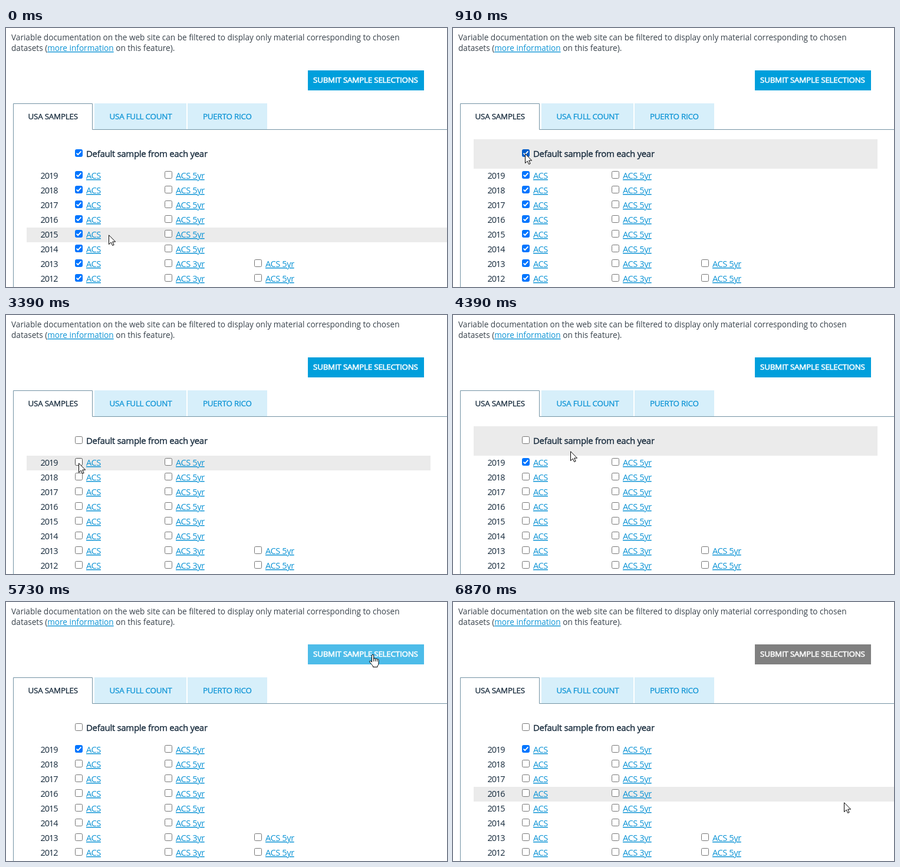
Recreate the animation shown at these times as an HTML page. Size 748x440 px, loop 6940 ms.

```html
<!DOCTYPE html>
<html lang="en">
<head>
<meta charset="utf-8">
<title>Sample selection</title>
<style>
  html, body { margin: 0; width: 100%; height: 100%; overflow: hidden; background: #fff; }
  svg { display: block; width: 748px; height: 440px; font-family: "Open Sans", "Noto Sans", sans-serif; }
  text { white-space: pre; fill: currentColor; color: #14283a; }
  .intro { font-size: 13.6px; color: #38424b; }
  .tab { font-size: 13.4px; letter-spacing: -.22px; stroke: currentColor; stroke-width: .3px; }
  .heading { font-size: 15px; letter-spacing: -.32px; stroke: currentColor; stroke-width: .35px; }
  .year { font-size: 14.4px; letter-spacing: -.95px; }
  .link { font-size: 14.6px; letter-spacing: -.42px; }
  .link, a { fill: #0b93d5; text-decoration: underline; }
  .blue { color: #0b93d5; }
  .white { color: #fff; stroke-width: .6px; }
</style>
</head>
<body>
<svg id="stage" viewBox="0 0 748 440"></svg>
<script>
const LOOP = 6940, STEP = 70;
const ROW_TOP = 239, ROW_HEIGHT = 25, ROWS = 8, COLUMN = 152;
const HEADER_TOP = 189;

// Pointer moves; each begins where the previous one ended.
const START = { x: 174, y: 351 };
const MOVES = [
  { from: 0, to: 490, x: 128, y: 243 },
  { from: 490, to: 910, x: 122, y: 213 },
  { from: 1890, to: 2640, x: 133, y: 232, bend: 24 },
  { from: 2640, to: 3060, x: 124, y: 256 },
  { from: 3250, to: 3390, x: 123, y: 251 },
  { from: 4040, to: 4740, x: 389, y: 181, power: 1.8 },
  { from: 4750, to: 5450, x: 613, y: 94, power: 0.6 },
  { from: 5450, to: 5730, x: 622, y: 89 },
  { from: 6380, to: 6870, x: 663, y: 340 }
];
const CLEAR_ALL = { press: 1240, release: 1500 };
const PICK_FIRST = { press: 3650, release: 3850 };
const SUBMIT_AT = 6320;

const text = (x, y, cls, content) => `<text x="${x}" y="${y}" class="${cls}">${content}</text>`;
const rect = (x, y, w, h, fill, extra = "") =>
  `<rect x="${x}" y="${y}" width="${w}" height="${h}" fill="${fill}" ${extra}/>`;
const boxes = [];

function checkbox(x, y, kind) {
  boxes.push({ x, y, kind });
  return `<g class="box" transform="translate(${x} ${y})">
    <rect x=".5" y=".5" width="12" height="12" rx="2"/>
    <path d="M2.6 6.6 5.1 9.1 10.4 3.4" fill="none" stroke="#fff" stroke-width="1.9"/></g>`;
}

function yearRow(i) {
  const y = ROW_TOP + i * ROW_HEIGHT, year = 2019 - i;
  const labels = year > 2013 ? ["ACS", "ACS 5yr"] : ["ACS", "ACS 3yr", "ACS 5yr"];
  return text(58.5, y + 17, "year", year) + labels.map((label, col) =>
    checkbox(117 + col * COLUMN, y + 4, col ? "extra" : year) +
    text(136 + col * COLUMN, y + 17, "link", label)).join("");
}

const stage = document.getElementById("stage");
stage.innerHTML =
  rect(35, 0, 713, 0, "#ebebeb", 'id="highlight"') +
  text(9, 21, "intro", "Variable documentation on the web site can be filtered to display only material corresponding to chosen") +
  text(9, 39, "intro", "datasets (<a>more information</a> on this feature).") +
  rect(512, 72, 197, 34, "#009fdc", 'id="submit"') +
  text(521, 93, "tab white", "SUBMIT SAMPLE SELECTIONS") +
  rect(150, 128, 156, 44, "#d7effa") +
  rect(308, 128, 135, 44, "#d7effa") +
  `<path d="M12.5 440V128.5H146.5V172.5H748" fill="none" stroke="#7393a4"/>` +
  text(37.5, 155, "tab", "USA SAMPLES") +
  text(175.5, 155, "tab blue", "USA FULL COUNT") +
  text(334, 155, "tab blue", "PUERTO RICO") +
  checkbox(117, 206, "default") +
  text(136, 219, "heading", "Default sample from each year") +
  Array.from({ length: ROWS }, (_, i) => yearRow(i)).join("") +
  `<g id="pointer" fill="#fff" stroke="#000">
    <path id="arrow" d="M.5 .8V16.6L4.2 13.1 6.7 18.5 9.1 17.4 6.7 12.1H11.6Z"/>
    <g id="hand" transform="translate(-6)">
      <path d="M4.5 13V2a1.6 1.6 0 0 1 3.2 0V8q0-1.3 1.5-1.2 1.4 0 1.5 1.5.1-1 1.4-1 1.3.1 1.4 1.5.2-.8 1.3-.7 1.2.2 1.2 1.8V15q0 3-2 5v1.5H6.5V20Q5 18 1 13.2q-.9-1.4.2-2.1 1.2-.6 3.3 1.9Z"/>
      <path d="M7.7 8v4M10.7 8.5V12M13.5 9.5V12" fill="none"/>
    </g></g>`;

const [highlight, submit, pointer, arrow, hand] =
  ["highlight", "submit", "pointer", "arrow", "hand"].map(id => document.getElementById(id));
const boxNodes = [...document.querySelectorAll(".box")];

function pointerAt(t) {
  const i = MOVES.findLastIndex(move => move.from <= t);
  const a = MOVES[i - 1] ?? START, b = MOVES[i];
  const elapsed = Math.floor((t - b.from) / STEP) * STEP;
  const progress = t >= b.to ? 1 : elapsed / (b.to - b.from);
  const p = progress ** (b.power ?? 1);
  const bow = (b.bend ?? 0) * Math.sin(Math.PI * p);
  return [Math.round(a.x + (b.x - a.x) * p + bow), Math.round(a.y + (b.y - a.y) * p)];
}

const isDown = (click, t) => t >= click.press && t < click.release;
const inside = (px, py, x, y, w, h) => px >= x && px < x + w && py >= y && py < y + h;

function isChecked(kind, t) {
  if (kind === "extra") return false;
  return t < CLEAR_ALL.release || (kind === 2019 && t >= PICK_FIRST.release);
}

function paintBox(node, { x, y, kind }, t, px, py) {
  const hover = inside(px, py, x, y, 13, 13);
  const pressed = hover && (isDown(CLEAR_ALL, t) || isDown(PICK_FIRST, t));
  const checked = isChecked(kind, t);
  const [square, tick] = node.children;
  const blue = pressed ? "#3793ff" : hover ? "#005cc8" : "#0075ff";
  const gray = pressed ? "#8d8d8d" : hover ? "#4f4f4f" : "#767676";
  square.setAttribute("fill", checked ? blue : "#fff");
  square.setAttribute("stroke", checked ? blue : gray);
  tick.setAttribute("visibility", checked ? "visible" : "hidden");
}

function paintHighlight(t, y) {
  const row = Math.floor((y - ROW_TOP - 1.5) / ROW_HEIGHT);
  const onHeader = y >= HEADER_TOP && row < 0;
  const narrow = onHeader || (t >= CLEAR_ALL.release && t < SUBMIT_AT);
  highlight.setAttribute("y", onHeader ? HEADER_TOP : ROW_TOP + row * ROW_HEIGHT);
  highlight.setAttribute("width", narrow ? 685 : 713);
  highlight.setAttribute("height", onHeader ? ROW_TOP - HEADER_TOP : row >= 0 ? ROW_HEIGHT : 0);
}

function draw() {
  const t = performance.now() % LOOP;
  const [x, y] = pointerAt(t);
  const onSubmit = inside(x, y, 512, 72, 197, 34);
  pointer.setAttribute("transform", `translate(${x} ${y})`);
  arrow.setAttribute("visibility", onSubmit ? "hidden" : "visible");
  hand.setAttribute("visibility", onSubmit ? "visible" : "hidden");
  submit.setAttribute("fill", t >= SUBMIT_AT ? "#808080" : onSubmit ? "#4dbce9" : "#009fdc");
  paintHighlight(t, y);
  boxNodes.forEach((node, i) => paintBox(node, boxes[i], t, x, y));
  requestAnimationFrame(draw);
}
draw();
</script>
</body>
</html>
```
